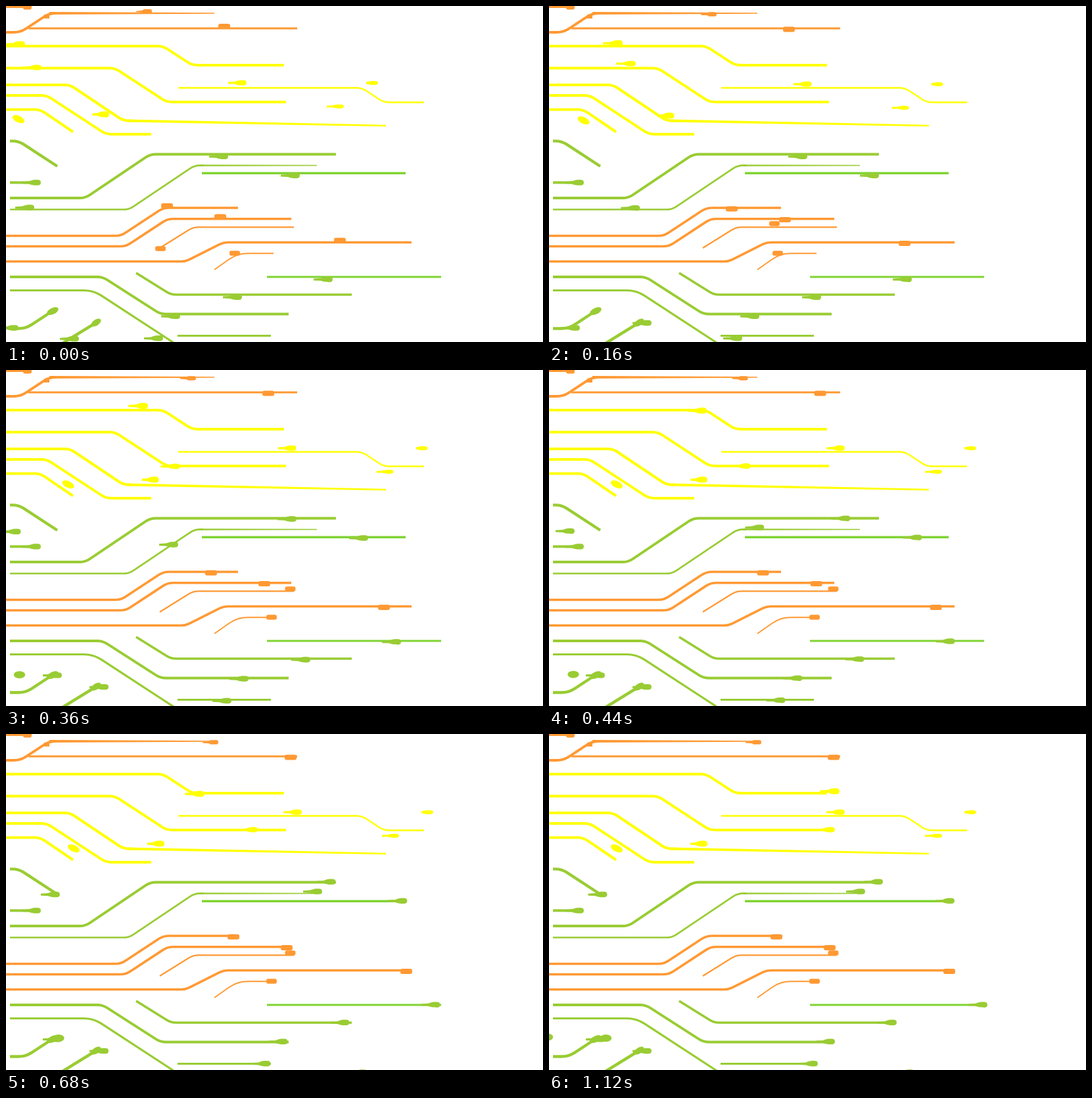
An HTML page with a canvas for the animation above (1160 ms loop, 817 px wide and 511 px high).

```html
<!DOCTYPE html>
<html lang="en">
<head>
<meta charset="utf-8">
<title>Circuit lines</title>
<style>
html, body { margin: 0; width: 100%; height: 100%; overflow: hidden; background: #fff; }
canvas { display: block; }
</style>
</head>
<body>
<canvas id="stage" width="817" height="511"></canvas>
<script>
const ctx = document.getElementById('stage').getContext('2d');
const LOOP = 1160, STEP = 40, SLOPE = .655;
const ORANGE = '#ff9933', YELLOW = '#ffff00', GREEN = '#99cc33', BRIGHT = '#80d433';

const ink = color => ctx.fillStyle = ctx.strokeStyle = color;
const ramp = (t, from, to) => Math.max(0, Math.min(1, (t - from) / (to - from)));

function path(width, radius, ...p) {
  ctx.lineWidth = width;
  ctx.beginPath();
  ctx.moveTo(p[0], p[1]);
  for (let i = 2; i < p.length - 2; i += 2) ctx.arcTo(p[i], p[i + 1], p[i + 2], p[i + 3], radius);
  ctx.lineTo(p[p.length - 2], p[p.length - 1]);
  ctx.stroke();
}

const level = (width, x0, x1, y) => path(width, 0, x0, y, x1, y);

// Two level runs joined by a slanted one, centred on mid
function trace(width, x0, y0, mid, x1, y1, slope = SLOPE) {
  const half = Math.abs(y1 - y0) / slope / 2;
  path(width, 28, x0, y0, mid - half, y0, mid + half, y1, x1, y1);
}

function taper(x0, y0, w0, x1, y1, w1) {
  ctx.beginPath();
  ctx.moveTo(x0, y0 - w0 / 2);
  ctx.lineTo(x1, y1 - w1 / 2);
  ctx.lineTo(x1, y1 + w1 / 2);
  ctx.lineTo(x0, y0 + w0 / 2);
  ctx.fill();
}

// Heads are placed by their right end and middle height
function pod(x, y, length = 29, height = 8.5) {
  const h = height / 2, neck = x - Math.min(length, 18);
  ctx.beginPath();
  ctx.moveTo(x - length, y - 1.3);
  ctx.lineTo(neck, y - h * .45);
  ctx.bezierCurveTo(x - 12, y - h, x - 10, y - h, x - 5, y - h);
  ctx.quadraticCurveTo(x, y - h, x, y);
  ctx.quadraticCurveTo(x, y + h, x - 5, y + h);
  ctx.bezierCurveTo(x - 10, y + h, x - 12, y + h, neck, y + h * .5);
  ctx.lineTo(x - length, y + 1.7);
  ctx.fill();
}

function block(x, y, width = 17, height = 8) {
  ctx.beginPath();
  ctx.roundRect(x - width, y - height / 2, width, height, 3);
  ctx.fill();
}

function blob(x, y, rx, ry, angle = 0) {
  ctx.beginPath();
  ctx.ellipse(x, y, rx, ry, angle, 0, Math.PI * 2);
  ctx.fill();
}

// Keys are [time, ...values]
function along(t, ...keys) {
  const i = Math.max(1, keys.findIndex(k => k[0] >= t));
  const to = t > keys[keys.length - 1][0] ? keys.length - 1 : i;
  const a = keys[to - 1], b = keys[to];
  const k = ramp(t, a[0], b[0]);
  return a.slice(1).map((v, n) => v + (b[n + 1] - v) * k);
}

function orangeWires() {
  ink(ORANGE);
  level(4, 0, 30, 1);
  block(39, 1, 13, 9);
  path(3.8, 34, 0, 40, 22, 40, 66, 11, 76, 11);
  taper(66, 11, 4, 317, 11, 1.5);
  ctx.fillRect(58, 13, 8, 6);
  level(3, 34, 443, 34);
  trace(3.6, 0, 349.5, 207, 353, 307);
  trace(3.6, 0, 365.5, 214, 434, 323.8);
  trace(3.6, 0, 388.5, 302, 617, 359.5, .5);
  path(2.2, 28, 234, 368, 285, 336.3, 438, 336.3);
  path(1.9, 50, 317, 401, 352, 376.3, 407, 376.3);
}

function yellowWires() {
  ink(YELLOW);
  trace(4, 0, 61, 261, 423, 90);
  trace(4, 0, 94.5, 205, 426, 146);
  trace(2.5, 262, 124.5, 558, 636, 146.5);
  trace(4, 0, 120, 138, 190, 174.5, .67);
  taper(186, 174.6, 4, 578, 182, 2.5);
  trace(4, 0, 136, 107, 221, 195);
  path(4, 28, 0, 157.5, 52, 157.5, 102, 191.5);
}

function greenWires() {
  ink(GREEN);
  path(4.3, 30, 6, 205.3, 19, 205.3, 78, 243.7);
  trace(3.9, 6, 292, 170, 502, 225.5, .67);
  trace(2.7, 6, 309.5, 237, 300, 242.4, .67);
  taper(296, 242.4, 2.5, 473, 242.4, 1.5);
  trace(3.8, 6, 412, 191, 430, 468.5, .64);
  path(3.2, 50, 6, 432.5, 133, 432.5, 255, 512);
  path(3.6, 28, 198, 406, 251, 439, 526, 439);
  level(3.2, 261, 403, 501.5);
  path(4.3, 36, 6, 490.5, 30, 490.5, 72, 463);
  path(4.5, 0, 86, 513, 138, 481);
  level(4, 6, 36, 268.5);
  pod(53, 268.5);
  blob(71, 464, 9.5, 4.8, -.45);
  blob(137, 481.5, 8.5, 4.5, -.6);
  ink(BRIGHT);
  level(3.4, 298, 608, 254.2);
  level(3, 397, 662, 412);
}

function orangeHeads(t) {
  const [dx] = along(t, [0, 0], [160, 33], [560, 101]);
  const dy = .4 - 4.4 * (1 - ramp(t, 0, STEP));
  ink(ORANGE);
  block(222 + dx, 12 + dy, 14, 6.5);
  taper(198 + dx, 12.5 + dy, 1.5, 212 + dx, 12 + dy, 4);
  for (const [x, y] of [[341, 35], [254, 308], [335, 324.5], [517, 360.5]]) block(x + dx, y + dy, 18);
  block(...along(t, [0, 243, 369], [70, 288, 337], [160, 351, 331], [300, 440.5, 333]), 16, 7.5);
  block(356 + 56 * ramp(t, 160, 320), 376, 16, 7.5);
}

function yellowHeads(t) {
  const dx = 84 * ramp(t, 0, 400);
  const dy = -2 * (1 - ramp(t, 0, STEP));
  ink(YELLOW);
  pod(366 + dx, 118.7 + dy, 28, 8);
  pod(566 + dx, 118.9 + dy, 18, 6);
  pod(514 + dx, 154.7 + dy, 26, 6);
  pod(157 + dx, 166.8 + dy, 26, 9);
  blob(19 + dx, 174 + dy, 9.8, 5, .45);
  pod(...along(t, [0, 29, 58], [360, 216, 54.5], [520, 264, 69], [680, 302, 91], [840, 442, 87]), 30, 9);
  pod(...along(t, [0, 54, 93.5], [160, 132, 87.5], [360, 265, 146.5], [520, 349, 145.5],
    [680, 383, 145.5], [1120, 435, 145.5]), 30, 8);
}

function greenHeads(t) {
  const [dx] = along(t, [0, 0], [160, 55], [360, 104], [520, 137], [720, 170]);
  const dy = 4 * (1 - ramp(t, 160, 520));
  ink(GREEN);
  const row = [[338, 224.8], [447, 253.8], [497, 411.7], [359, 438.8],
    [265, 467.8], [239, 501.3], [386, 514.5], [-81.5, 244]];
  for (const [x, y] of row) pod(x + dx, y + dy);
  blob(-83.5 + dx, 462.5 + dy / 2, 8.7, 5.5);
  blob(-172.5 + dx, 461 + dy / 2, 8.7, 5.5);
  pod(...along(t, [0, 43, 306.5], [250, 192, 307.5], [360, 262, 265.5], [420, 312, 239.5], [640, 481, 239.5]));
  pod(...along(t, [0, 19, 489.5], [160, 47, 489.5], [360, 85, 464.3]));
  pod(111 + 45 * ramp(t, 0, 160), 506 - 24 * ramp(t, 0, 160));
}

function draw(t) {
  ctx.fillStyle = '#fff';
  ctx.fillRect(0, 0, 817, 511);
  orangeWires();
  yellowWires();
  greenWires();
  orangeHeads(t);
  yellowHeads(t);
  greenHeads(t);
}

const start = performance.now();
function tick() {
  const t = (performance.now() - start) % LOOP;
  draw(Math.floor(t / STEP) * STEP);
  requestAnimationFrame(tick);
}
tick();
</script>
</body>
</html>
```
